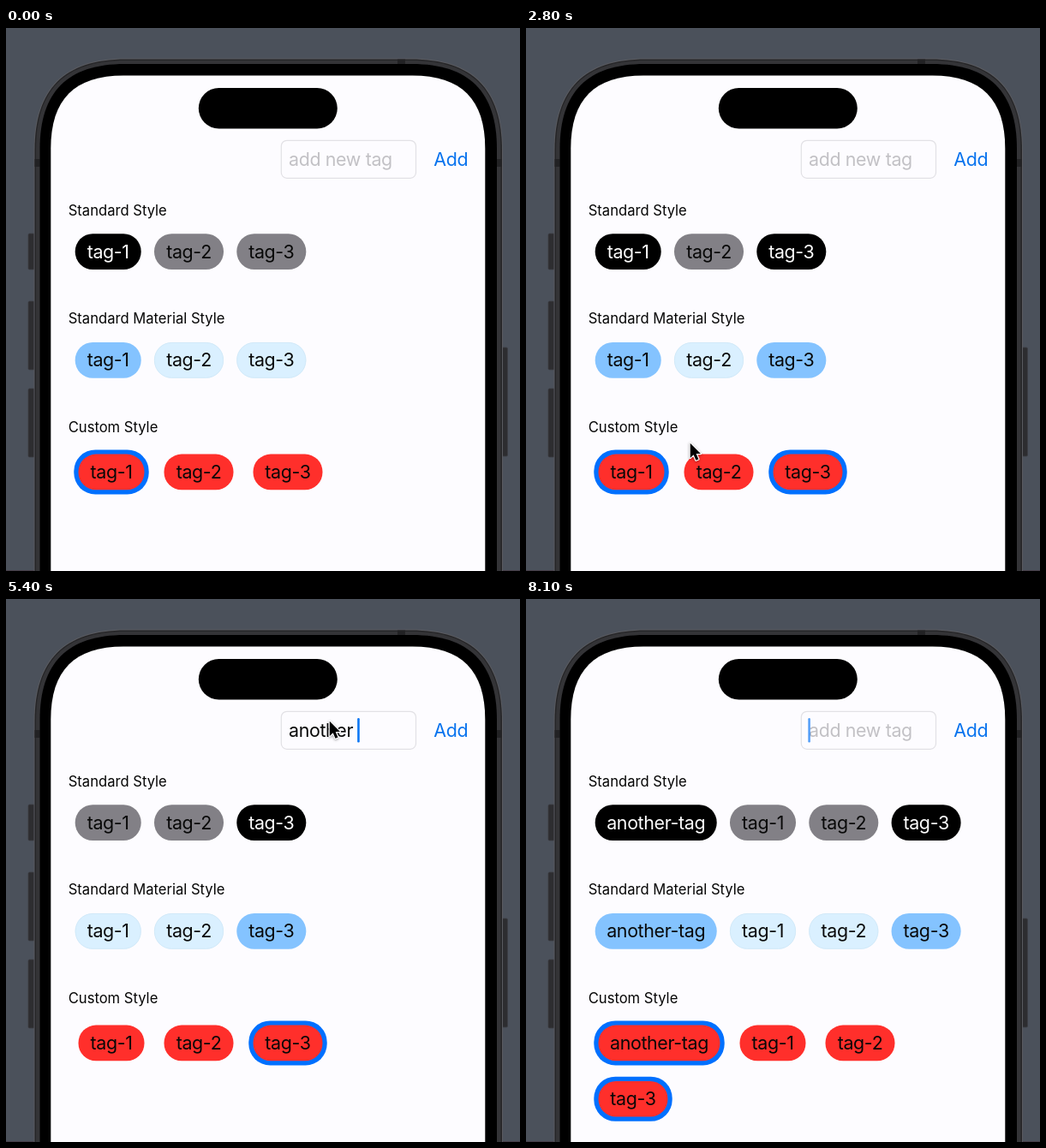
Animation of 600x634 px, one loop 8.2 s. Source, as an HTML page with a canvas:

```html
<!DOCTYPE html>
<html lang="en">
<head>
<meta charset="utf-8">
<title>Tag styles</title>
<style>
  html, body { margin: 0; width: 100%; height: 100%; overflow: hidden; background: #4b515b; }
  canvas { display: block; width: 600px; height: 634px; }
</style>
</head>
<body>
<canvas id="stage"></canvas>
<script>
const W = 600, H = 634, LOOP = 8200, STEP = 100;
const FONT = 'Inter, Roboto, "Liberation Sans", sans-serif';
const BLUE = '#0070ff', LINK = '#0873ee';
const PILL_H = 41.7, RING = 5.2;
const PILL_W = { 'tag-1': 77, 'tag-2': 81, 'tag-3': 81, 'another-tag': 142 };

const canvas = document.getElementById('stage');
const ctx = canvas.getContext('2d');
const dpr = window.devicePixelRatio || 1;
canvas.width = W * dpr;
canvas.height = H * dpr;

const ADD_AT = 6750, FOCUS_AT = 4200;

// Each tap toggles one tag; the label dims while pressed.
const TAPS = [
  { at: 1200, tag: 'tag-2', row: 0 },
  { at: 1700, tag: 'tag-3', row: 1 },
  { at: 2500, tag: 'tag-2', row: 2 },
  { at: 3400, tag: 'tag-1', row: 1 }
];

const TYPING = [
  [4500, 'a'], [4600, 'an'], [4700, 'ano'], [4800, 'anot'], [5000, 'anoth'],
  [5100, 'anothe'], [5200, 'another'], [5400, 'another '], [5500, 'another-'],
  [5700, 'another-t'], [5800, 'another-ta'], [5900, 'another-tag']
];

// Pointer stops: time, x, y.
const POINTER = [
  [400, 290, 640], [1000, 232, 251], [1250, 232, 251], [1600, 324, 390],
  [1800, 324, 390], [2200, 202, 487], [2400, 214, 515], [2600, 214, 515],
  [3200, 125, 395], [3500, 125, 395], [4000, 377, 142], [6000, 377, 142],
  [6500, 524, 157], [7300, 524, 157], [7700, 505, 650]
];

const ROWS = [
  { title: 'Standard Style', titleY: 218.6, y: 240.3, x: 80.7, gap: 15.3,
    on: '#000', off: '#828086', onText: '#fff' },
  { title: 'Standard Material Style', titleY: 345.3, y: 367, x: 80.7, gap: 15.3,
    on: '#84c3ff', off: '#daf0ff', edge: '#d0e7f6' },
  { title: 'Custom Style', titleY: 471.8, y: 497.6, x: 84.5, gap: 23,
    on: '#ff2f2b', off: '#ff2f2b', ring: true }
];

function box(x, y, w, h, r, fill, stroke, line = 1) {
  ctx.beginPath();
  ctx.roundRect(x, y, w, h, r);
  if (fill) { ctx.fillStyle = fill; ctx.fill(); }
  if (stroke) { ctx.strokeStyle = stroke; ctx.lineWidth = line; ctx.stroke(); }
}

// Upper part of a panel with smooth corners, running past the bottom edge.
function panel(l, t, r, radius, fill) {
  const e = radius * 1.18, c = e * 0.327, b = H + 5;
  ctx.beginPath();
  ctx.moveTo(l, b);
  ctx.lineTo(l, t + e);
  ctx.bezierCurveTo(l, t + c, l + c, t, l + e, t);
  ctx.lineTo(r - e, t);
  ctx.bezierCurveTo(r - c, t, r, t + c, r, t + e);
  ctx.lineTo(r, b);
  ctx.closePath();
  ctx.fillStyle = fill;
  ctx.fill();
}

function setFont(size, spacing) {
  ctx.font = `400 ${size}px ${FONT}`;
  ctx.letterSpacing = spacing + 'px';
}
const bodyFont = () => setFont(21.4, -0.35);
const titleFont = () => setFont(16.6, 0);

function text(str, x, y, color, align = 'left') {
  ctx.textAlign = align;
  ctx.fillStyle = color;
  ctx.fillText(str, x, y);
}

function drawPhone() {
  ctx.fillStyle = '#4b515b';
  ctx.fillRect(0, 0, W, H);
  ctx.fillStyle = '#463f49';
  ctx.fillRect(0, H - 1, W, 1);

  for (const [y, h] of [[240, 42], [319, 80], [421, 80]]) {
    box(26, y, 8, h, 1.5, '#2d2d30', '#3d3e43', 0.8);
  }
  box(578, 373, 7.5, 127, 1.5, '#2d2d30', '#3d3e43', 0.8);

  panel(32.5, 35.5, 580, 91, '#5a5b60');
  panel(33.5, 36.5, 579, 90, '#252527');
  panel(35, 38, 577.5, 88, '#343437');
  ctx.fillStyle = '#222224';
  ctx.fillRect(33.5, 153, 6, 9);
  ctx.fillRect(573, 153, 6, 9);
  ctx.fillRect(457, 36.5, 9, 6);
  panel(39.5, 42, 573, 84, '#000');
  panel(52.3, 55.6, 559.3, 72, '#fdfcff');
  box(224.8, 70, 162, 47.5, 23.7, '#000');
}

function isOn(tag, t) {
  if (tag === 'another-tag') return true;
  const taps = TAPS.filter(tap => tap.tag === tag && t >= tap.at).length;
  return (tag === 'tag-1') !== (taps % 2 === 1);
}

const isPressed = (tag, row, t) =>
  TAPS.some(p => p.tag === tag && p.row === row && Math.abs(t - p.at) <= 100);

function drawPill(row, index, tag, x, y, t) {
  const w = PILL_W[tag], on = isOn(tag, t);
  if (row.ring && on) {
    box(x - RING, y - RING, w + 2 * RING, PILL_H + 2 * RING, 25, BLUE);
  }
  box(x, y, w, PILL_H, 20.5, on ? row.on : row.off);
  if (row.edge && !on) {
    box(x + 0.4, y + 0.4, w - 0.8, PILL_H - 0.8, 20, null, row.edge, 0.8);
  }
  ctx.globalAlpha = isPressed(tag, index, t) ? 0.75 : 1;
  text(tag, x + w / 2, y + 28.2, on && row.onText || '#080808', 'center');
  ctx.globalAlpha = 1;
}

function drawRows(t) {
  const tags = ['tag-1', 'tag-2', 'tag-3'];
  if (t >= ADD_AT) tags.unshift('another-tag');
  ROWS.forEach((row, index) => {
    titleFont();
    text(row.title, 72.7, row.titleY, '#050505');
    bodyFont();
    let x = row.x, y = row.y;
    for (const tag of tags) {
      if (x + PILL_W[tag] > 520) { x = row.x; y += 65.3; }
      drawPill(row, index, tag, x, y, t);
      x += PILL_W[tag] + row.gap;
    }
  });
}

function typedText(t) {
  if (t >= ADD_AT) return '';
  let str = '';
  for (const [at, value] of TYPING) if (t >= at) str = value;
  return str;
}

function caretAlpha(t) {
  if (t < FOCUS_AT) return 0;
  if (t < ADD_AT) return 1;
  const p = (t - ADD_AT) % 1000 / 1000;
  if (p < 0.28) return 1;
  if (p < 0.5) return 1 - (p - 0.28) / 0.22;
  return p < 0.8 ? 0 : (p - 0.8) / 0.2;
}

function drawField(t) {
  box(321.3, 131.3, 157.2, 44, 6.5, '#fdfcff', '#e2e1e5', 1.2);
  bodyFont();
  const str = typedText(t);
  text(str || 'add new tag', 330, 161.4, str ? '#080808' : '#c2c1c5');
  ctx.globalAlpha = caretAlpha(t);
  box(329.3 + ctx.measureText(str).width, 139, 2.6, 28.5, 1.2, '#0a76f5');
  ctx.globalAlpha = 1;
  text('Add', 499.3, 161.2, LINK);
}

function pointerAt(t) {
  const i = POINTER.findIndex(p => p[0] > t);
  if (i < 1) return null;
  const [t0, x0, y0] = POINTER[i - 1], [t1, x1, y1] = POINTER[i];
  const u = (t - t0) / (t1 - t0), k = u * u * (3 - 2 * u);
  return [x0 + (x1 - x0) * k, y0 + (y1 - y0) * k];
}

function drawPointer(t) {
  const pos = pointerAt(t);
  if (!pos) return;
  ctx.save();
  ctx.translate(pos[0] + 0.8, pos[1] + 0.8);
  const arrow = new Path2D('M0 0V17.2L3.9 13.5L6.7 20L9.7 18.7L6.9 12.3H12.2Z');
  ctx.lineJoin = 'round';
  ctx.strokeStyle = '#fff';
  ctx.lineWidth = 2.4;
  ctx.shadowColor = 'rgba(0,0,0,.35)';
  ctx.shadowBlur = 3 * dpr;
  ctx.shadowOffsetY = dpr;
  ctx.stroke(arrow);
  ctx.shadowColor = 'transparent';
  ctx.fillStyle = '#000';
  ctx.fill(arrow);
  ctx.restore();
}

function draw(t) {
  ctx.setTransform(dpr, 0, 0, dpr, 0, 0);
  drawPhone();
  drawField(t);
  drawRows(t);
  drawPointer(t);
}

const start = performance.now();
function tick() {
  const t = (performance.now() - start) % LOOP;
  draw(Math.floor(t / STEP) * STEP);
  requestAnimationFrame(tick);
}
tick();
</script>
</body>
</html>
```
